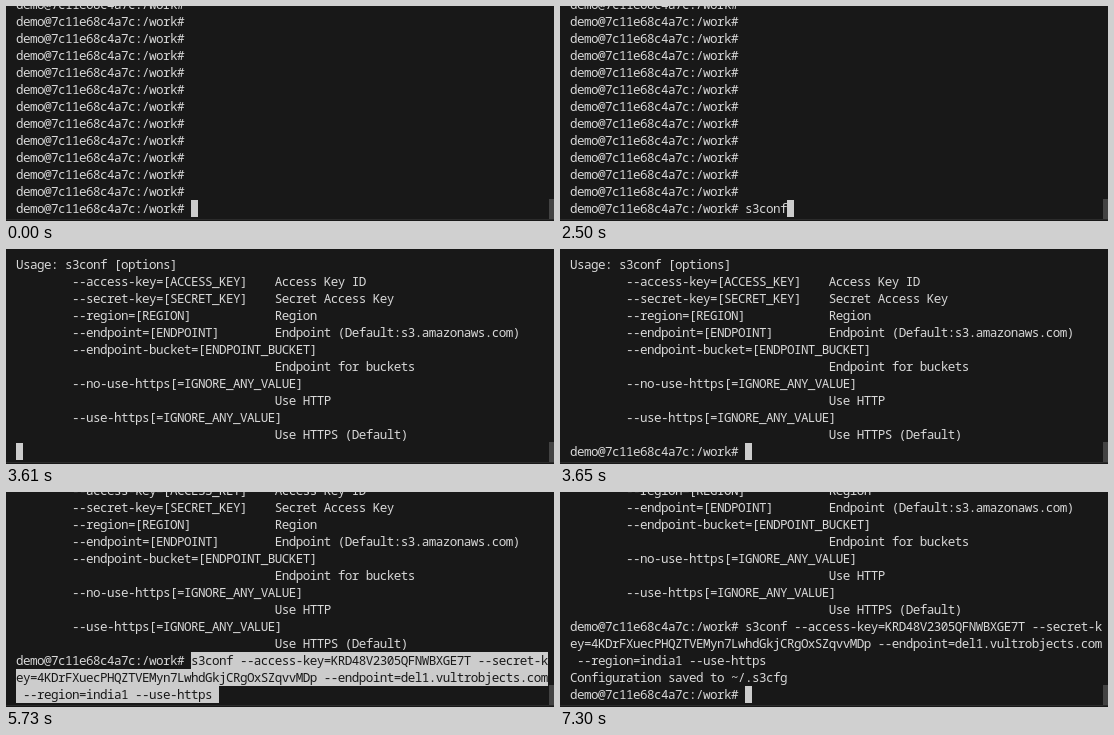
Animation of 548 by 215 pixels, one loop 8000 ms. Source, as an HTML page:

```html
<!DOCTYPE html>
<html lang="en">
<head>
<meta charset="utf-8">
<title>Terminal</title>
<style>
  html, body { margin: 0; width: 100%; height: 100%; overflow: hidden; background: #181818; }
  #stage { position: relative; width: 548px; height: 215px; overflow: hidden; background: #181818; }
  /* Glyphs are a little wider than the 7px terminal cell */
  #screen {
    position: absolute; left: 10px; top: -10px; margin: 0;
    font: 500 12.6px/17px "Noto Sans Mono", "DejaVu Sans Mono", monospace;
    letter-spacing: -.56px; font-variant-ligatures: none; color: #d8d8d8;
  }
  #screen div { height: 17px; white-space: pre; }
  #screen b {
    display: inline-block; height: 17px; vertical-align: top;
    font-weight: inherit; color: #181818; background: #ccc;
  }
  #thumb { position: absolute; left: 543px; top: 193px; width: 5px; height: 20px; background: #434343; }
  #edge { position: absolute; left: 0; top: 213px; width: 548px; height: 1px; background: #2b2b2b; }
</style>
</head>
<body>
<div id="stage">
  <pre id="screen"></pre>
  <div id="thumb"></div>
  <div id="edge"></div>
</div>
<script>
const LOOP = 8000, ROWS = 13;
const prompt = 'demo@7c11e68c4a7c:/work# ';
const invert = s => `<b>${s}</b>`;
const cursor = invert(' ');
const option = (flag, note = '') => ('        ' + flag).padEnd(37) + note;

const idle = Array(ROWS - 1).fill(prompt);
const help = [
  '',
  'Usage: s3conf [options]',
  option('--access-key=[ACCESS_KEY]', 'Access Key ID'),
  option('--secret-key=[SECRET_KEY]', 'Secret Access Key'),
  option('--region=[REGION]', 'Region'),
  option('--endpoint=[ENDPOINT]', 'Endpoint (Default:s3.amazonaws.com)'),
  option('--endpoint-bucket=[ENDPOINT_BUCKET]'),
  option('', 'Endpoint for buckets'),
  option('--no-use-https[=IGNORE_ANY_VALUE]'),
  option('', 'Use HTTP'),
  option('--use-https[=IGNORE_ANY_VALUE]'),
  option('', 'Use HTTPS (Default)')
];
const command = [
  's3conf --access-key=KRD48V2305QFNWBXGE7T --secret-k',
  'ey=4KDrFXuecPHQZTVEMyn7LwhdGkjCRgOxSZqvvMDp --endpoint=del1.vultrobjects.com',
  ' --region=india1 --use-https'
];
const [first, second, third] = command;
const pasted = [prompt + invert(first), invert(second)];
const entered = [...help, prompt + first, second];

// Each step: start time and the lines on the terminal from then on
const word = 's3conf';
const steps = [0, 550, 970, 1490, 2110, 2240, 2500].map(
  (t, n) => [t, [...idle, prompt + word.slice(0, n) + cursor]]);
steps.push(
  [3570, [...idle, invert(prompt[0]) + prompt.slice(1) + word]],
  [3610, [...help, cursor]],
  [3650, [...help, prompt + cursor]],
  [5690, [...help, ...pasted]],
  [5730, [...help, ...pasted, invert(third + ' ')]],
  [7260, [...entered, cursor + third.slice(1)]],
  [7300, [...entered, third, 'Configuration saved to ~/.s3cfg', prompt + cursor]]
);

const screen = document.getElementById('screen');
const start = performance.now();
let shown = null;

function draw() {
  const t = (performance.now() - start) % LOOP;
  const lines = steps.findLast(([at]) => at <= t)[1];
  if (lines !== shown) {
    screen.innerHTML = lines.slice(-ROWS).map(s => `<div>${s}</div>`).join('');
    shown = lines;
  }
  requestAnimationFrame(draw);
}
draw();
</script>
</body>
</html>
```
